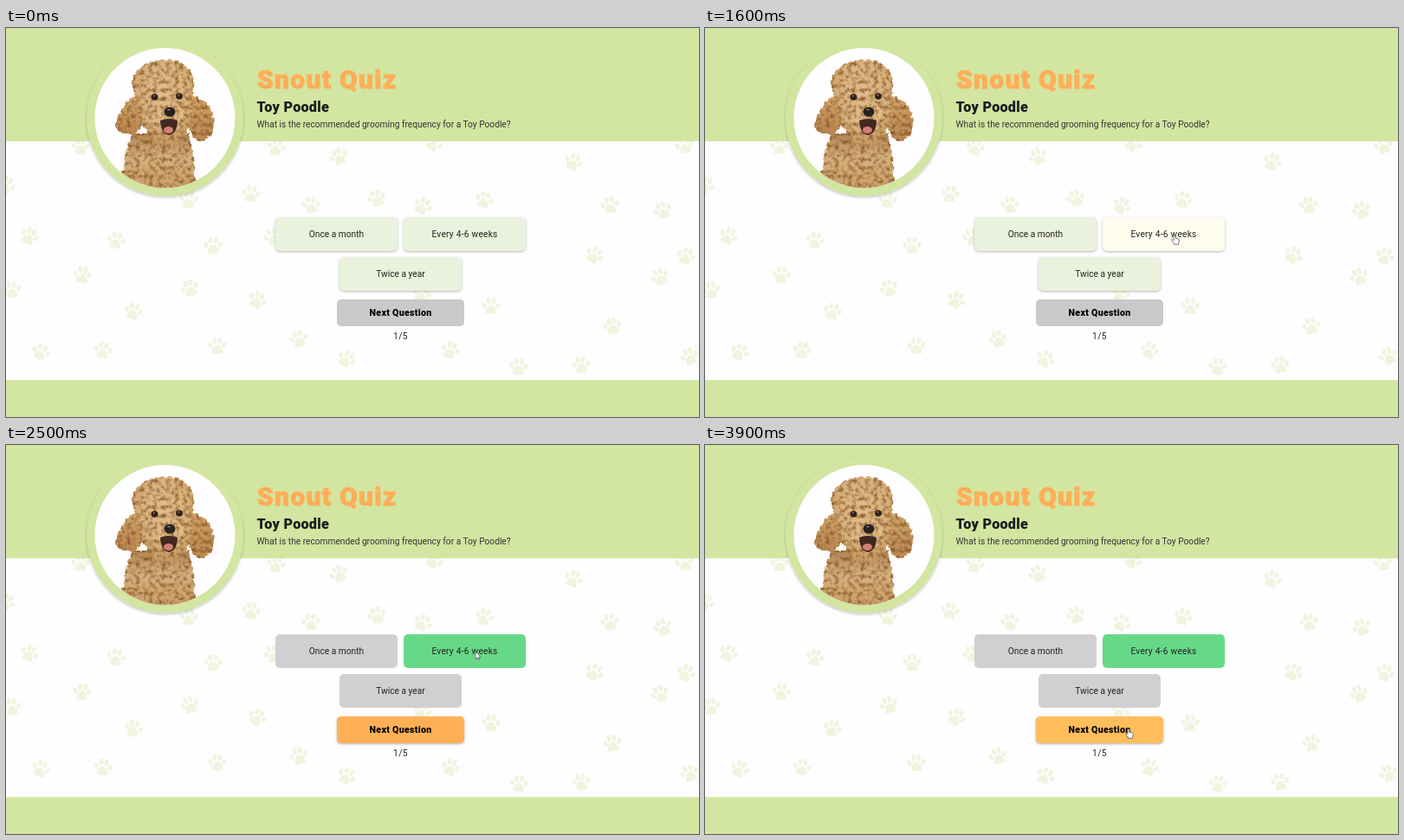
These frames come from a looping animation (800 px wide and 450 px high, 4000 ms). An HTML page:

```html
<!DOCTYPE html>
<html lang="en">
<head>
<meta charset="utf-8">
<title>Snout Quiz</title>
<style>
  html, body { margin: 0; width: 100%; height: 100%; overflow: hidden; }
  body { position: relative; background: #fefdff; font: 10.2px Roboto, sans-serif; color: #222; }
  svg { position: absolute; left: 0; top: 0; }
  .title { font-size: 30px; font-weight: 900; letter-spacing: 1.3px; fill: #ffae57; stroke: #ffae57; stroke-width: .9px; }
  .breed { font-size: 16.2px; font-weight: 900; letter-spacing: .25px; fill: #1b1b1f; }
  .ask { font-size: 10.2px; fill: #333; }
  .count { letter-spacing: .4px; fill: #222; text-anchor: middle; }

  .btn {
    position: absolute; width: 141px; height: 39px; line-height: 39px;
    border-radius: 5px; text-align: center; background: #eaf1dc;
    box-shadow: 0 1px 3px rgba(0, 0, 0, .28);
    animation: 4s infinite step-end;
  }
  .wrong { animation-name: disable; }
  .right { letter-spacing: .25px; animation-name: answer; }
  .next {
    left: 382px; top: 314px; width: 147px; height: 31px; line-height: 31px;
    font-size: 10.6px; font-weight: 800; letter-spacing: .3px; color: #000;
    animation-name: enable;
  }

  /* The picture advances every 100 ms, which is 2.5% of the loop. */
  @keyframes disable {
    47.5% { background: #eaf1dc; box-shadow: 0 1px 3px rgba(0, 0, 0, .28); animation-timing-function: steps(2); }
    52.5%, 100% { background: #d2cfd2; box-shadow: 0 0 0 rgba(0, 0, 0, 0); }
  }
  @keyframes answer {
    0% { background: #eaf1dc; transform: none; }
    22.5% { background: #eaf1dc; animation-timing-function: steps(3); }
    30% { background: #fffdee; }
    47.5% { background: #fffdee; transform: scaleY(1); box-shadow: 0 1px 3px rgba(0, 0, 0, .28); animation-timing-function: steps(2); }
    52.5% { background: #66d988; transform: scaleY(.018); box-shadow: 0 0 0 rgba(0, 0, 0, 0); animation-timing-function: steps(2); }
    57.5%, 100% { background: #66d988; transform: scaleY(1); box-shadow: 0 0 0 rgba(0, 0, 0, 0); }
  }
  @keyframes enable {
    0% { background: #cac8cb; box-shadow: none; }
    47.5% { background: #cac8cb; box-shadow: 0 0 0 rgba(0, 0, 0, 0); animation-timing-function: steps(2); }
    52.5% { background: #ffb056; box-shadow: 0 1px 3px rgba(0, 0, 0, .3); }
    72.5% { background: #ffb056; animation-timing-function: steps(1); }
    75%, 100% { background: #ffbd5c; box-shadow: 0 1px 3px rgba(0, 0, 0, .3); }
  }

  .cursor { animation: move 4s infinite step-end, show 4s infinite step-end; }
  .hand { animation: hand 4s infinite step-end; }
  .arrow { animation: arrow 4s infinite step-end; }
  @keyframes move {
    0% { transform: translate(745px, 300px); }
    15% { transform: translate(745px, 300px); animation-timing-function: steps(3); }
    22.5% { transform: translate(562px, 240.5px); animation-timing-function: steps(3); }
    30% { transform: translate(542px, 239px); }
    65% { transform: translate(542px, 238.5px); animation-timing-function: steps(3); }
    72.5% { transform: translate(499px, 316px); }
    75% { transform: translate(497px, 319px); animation-timing-function: steps(4); }
    85%, 100% { transform: translate(489px, 328px); }
  }
  @keyframes show { 0% { opacity: 0; } 15%, 100% { opacity: 1; } }
  @keyframes hand {
    0%, 47.5% { opacity: 0; }
    22.5%, 72.5%, 100% { opacity: 1; }
  }
  @keyframes arrow {
    0%, 47.5% { opacity: 1; }
    22.5%, 72.5%, 100% { opacity: 0; }
  }
</style>
</head>
<body>
<svg width="800" height="450" viewBox="0 0 800 450">
  <defs>
    <g id="paw">
      <path d="M0-1.5C3-1.5 6 3 6 6C6 9.5 3 8.3 0 8.3S-6 9.5-6 6C-6 3-3-1.5 0-1.5Z"/>
      <ellipse cx="-7.6" cy="-1" rx="2.2" ry="3.2" transform="rotate(-25 -7.6 -1)"/>
      <ellipse cx="-2.9" cy="-6" rx="2.3" ry="3.6"/>
      <ellipse cx="2.9" cy="-6" rx="2.3" ry="3.6"/>
      <ellipse cx="7.6" cy="-1" rx="2.2" ry="3.2" transform="rotate(25 7.6 -1)"/>
    </g>
    <radialGradient id="fur" cx=".5" cy=".4" r=".65">
      <stop offset="0" stop-color="#e0bd8c"/>
      <stop offset=".6" stop-color="#d8b27c"/>
      <stop offset="1" stop-color="#c3955b"/>
    </radialGradient>
    <linearGradient id="ear" x2="0" y2="1">
      <stop offset="0" stop-color="#d0a469"/>
      <stop offset="1" stop-color="#b98850"/>
    </linearGradient>
    <linearGradient id="chest" x2="0" y2="1">
      <stop offset="0" stop-color="#b18553"/>
      <stop offset=".4" stop-color="#d6b07c"/>
      <stop offset="1" stop-color="#c99e67"/>
    </linearGradient>
    <filter id="curly" x="-10%" y="-10%" width="120%" height="120%" color-interpolation-filters="sRGB">
      <feTurbulence type="fractalNoise" baseFrequency=".2" numOctaves="3" seed="4" result="noise"/>
      <feDisplacementMap in="SourceGraphic" in2="noise" scale="6" xChannelSelector="R" yChannelSelector="G" result="coat"/>
      <feColorMatrix in="noise" values="0 0 0 0 .5  0 0 0 0 .3  0 0 0 0 .12  0 0 2 0 -.85"/>
      <feComposite in2="coat" operator="in" result="curls"/>
      <feMerge><feMergeNode in="coat"/><feMergeNode in="curls"/></feMerge>
    </filter>
    <filter id="drop" x="-10%" y="-10%" width="120%" height="120%">
      <feDropShadow dx="0" dy="1.5" stdDeviation="1.5" flood-opacity=".25"/>
    </filter>
    <clipPath id="disc"><circle cx="183.5" cy="104" r="81"/></clipPath>
  </defs>

  <g id="paws" fill="#eff5de"></g>
  <path d="M0 0H800V131H0ZM0 407.3H800V450H0Z" fill="#d2e5a1"/>

  <circle cx="183.5" cy="104" r="90.5" fill="#d2e5a1" filter="url(#drop)"/>
  <circle cx="183.5" cy="104" r="81" fill="#fefdff"/>
  <g clip-path="url(#disc)">
    <g filter="url(#curly)">
      <path d="M146 122C138 140 136 160 132 190H219C218 165 217 145 210 122Z" fill="url(#chest)"/>
      <path d="M154 78C140 80 138 88 132 97C123 108 126 123 139 123C152 125 159 116 159 98Z" fill="url(#ear)"/>
      <path d="M211 77C226 79 232 86 238 97C243 113 238 131 225 131C213 130 209 112 208 96Z" fill="url(#ear)"/>
      <path d="M181 37C204 35 220 51 217 70C216 80 213 84 213 94C214 112 208 134 187 134C167 134 158 118 157 104C157 94 154 86 149 78C139 56 155 38 181 37Z" fill="url(#fur)"/>
      <ellipse cx="188" cy="104" rx="20" ry="15" fill="#dfba86"/>
    </g>
    <path d="M178 107Q188 103 198 107Q198 122 188 124Q179 122 178 107Z" fill="#432820"/>
    <ellipse cx="187.5" cy="118" rx="5.5" ry="4" fill="#d67d74"/>
    <ellipse cx="189" cy="97" rx="6.5" ry="5.5" fill="#29211f"/>
    <ellipse cx="171.5" cy="80" rx="4" ry="3.7" fill="#32231a"/>
    <ellipse cx="200" cy="79" rx="4" ry="3.7" fill="#32231a"/>
    <path d="M170 78.6h1.6M198.6 77.6h1.6M186.5 94.6h3" stroke="#b9aaa0"/>
  </g>

  <text class="title" x="290" y="70">Snout Quiz</text>
  <text class="breed" x="289.5" y="97">Toy Poodle</text>
  <text class="ask" x="289.5" y="114.5">What is the recommended grooming frequency for a Toy Poodle?</text>
  <text class="count" x="455.5" y="360.3">1/5</text>
</svg>

<div class="btn wrong" style="left:311px;top:219px">Once a month</div>
<div class="btn right" style="left:458.5px;top:219px">Every 4-6 weeks</div>
<div class="btn wrong" style="left:385px;top:264.5px">Twice a year</div>
<div class="btn next">Next Question</div>

<svg width="800" height="450" viewBox="0 0 800 450">
  <g class="cursor" fill="#fff" stroke="#555" stroke-width=".8" stroke-linejoin="round">
    <path class="arrow" d="M0 0V8.6L2 6.8L3.3 9.8L4.6 9.2L3.3 6.3H6Z"/>
    <path class="hand" d="M-1 1Q0-.4 1 1V4.2L4.5 5Q5.6 5.3 5.4 6.8L4.6 9.5V11.3H-.8V10L-3.6 6.6Q-3.6 5.2-2.3 5.6L-1 6.8Z"/>
  </g>
</svg>

<script>
  const spots = [
    [384, 149], [655, 155], [283, 192], [352, 205], [428, 197], [481, 206], [552, 199],
    [211, 199], [697, 205], [758, 211], [27, 241], [127, 246], [239, 252], [308, 242],
    [679, 263], [785, 264], [88, 286], [7, 303], [212, 301], [290, 315], [147, 328],
    [560, 322], [700, 345], [755, 288], [40, 375], [112, 373], [244, 368], [338, 360],
    [393, 383], [513, 373], [592, 392], [664, 390], [789, 380], [0, 182], [312, 138],
    [86, 137], [783, 136], [494, 133], [480, 308]
  ];
  document.getElementById('paws').innerHTML = spots.map(([x, y], i) =>
    `<use href="#paw" transform="translate(${x} ${y}) rotate(${i * 47 % 60 - 25}) scale(1.05)"/>`).join('');
</script>
</body>
</html>
```
